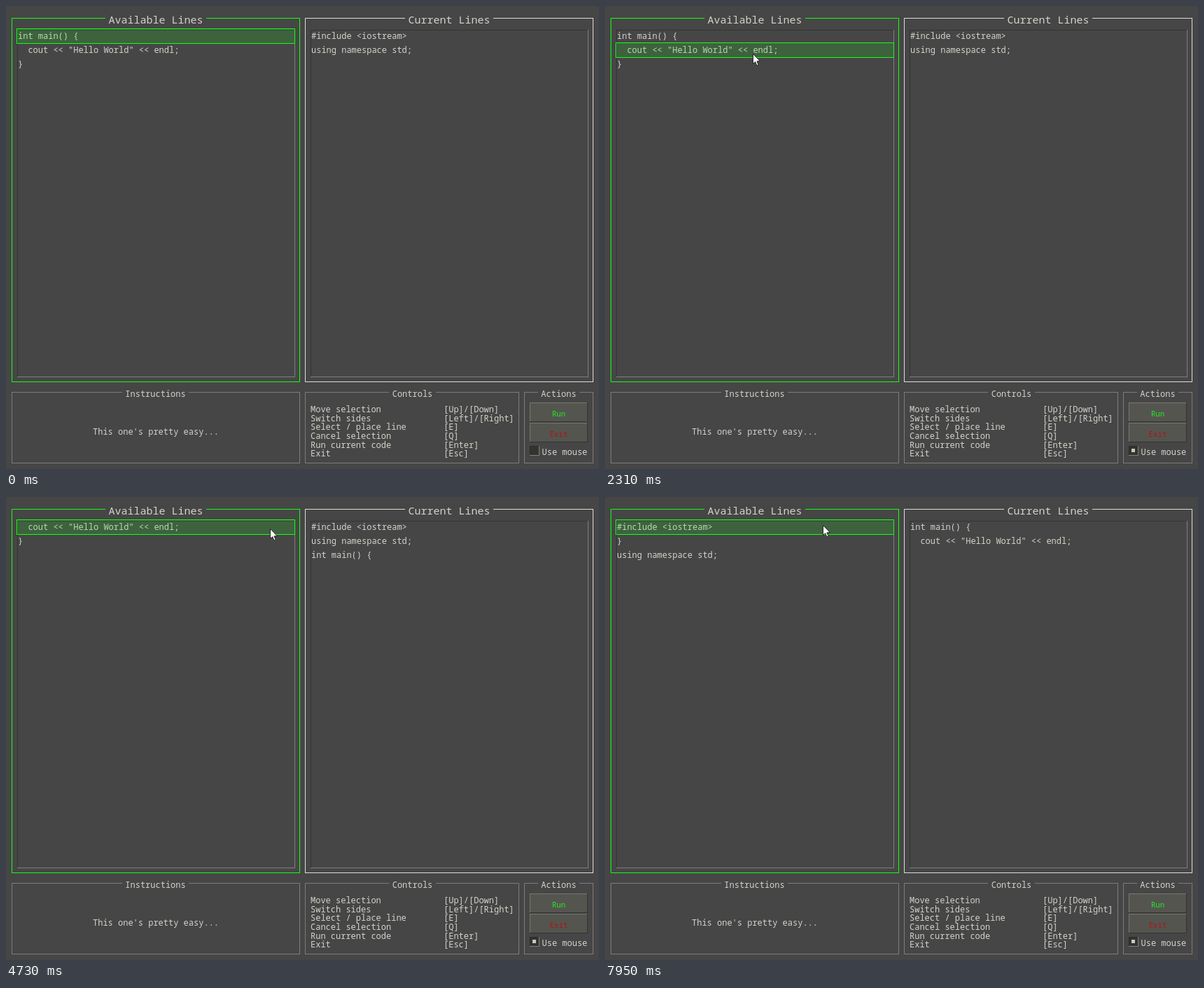
These frames come from a looping animation (847 by 661 pixels, 8000 ms). An HTML page with a canvas:

```html
<!DOCTYPE html>
<html lang="en">
<head>
<meta charset="utf-8">
<title>Line puzzle</title>
<style>
  html, body { margin: 0; height: 100%; overflow: hidden; background: #464646; }
  canvas { display: block; }
</style>
</head>
<body>
<canvas id="stage" width="847" height="661"></canvas>
<script>
const ctx = document.getElementById('stage').getContext('2d');
const LOOP = 8000, ROW = 20, LIST_TOP = 33;
const TEXT = '#d3d3cb', GREEN = '#11ff11', CYAN = '#22f4f4';

const LINES = {
  m: 'int main() {',
  c: '  cout << "Hello World" << endl;',
  b: '}',
  i: '#include <iostream>',
  u: 'using namespace std;'
};

const PANES = [
  { x: 8, list: 16, title: 'Available Lines', center: 214 },
  { x: 427, list: 435, title: 'Current Lines', center: 633 }
];

const CONTROLS = [
  ['Move selection', '[Up]/[Down]'],
  ['Switch sides', '[Left]/[Right]'],
  ['Select / place line', '[E]'],
  ['Cancel selection', '[Q]'],
  ['Run current code', '[Enter]'],
  ['Exit', '[Esc]']
];

// start, available lines, current lines, mode, side, row
const PHASES = [
  [0, 'mcb', 'iu', 'fixed', 0, 0],
  [1210, 'mcb', 'iu', 'hover'],
  [3900, 'mcb', 'iu', 'held', 0, 0],
  [4450, 'cb', 'ium', 'fixed', 0, 0],
  [5000, 'cb', 'ium', 'held', 0, 0],
  [5550, 'b', 'iumc', 'fixed', 0, 0],
  [5620, 'b', 'iumc', 'hover'],
  [5950, 'b', 'iumc', 'held', 1, 1],
  [6560, 'bu', 'imc', 'fixed', 0, 1],
  [6840, 'bu', 'imc', 'hover'],
  [7050, 'bu', 'imc', 'held', 1, 0],
  [7600, 'ibu', 'mc', 'fixed', 0, 0]
];

// time, x, y of the pointer tip
const PATH = [
  [130, 767, 656], [400, 755, 640], [540, 746, 638], [670, 752, 638],
  [1000, 752, 638], [1630, 234, 51], [1755, 234, 51], [1900, 216, 60],
  [2170, 202, 80], [2380, 215, 62], [2590, 300, 46], [2870, 505, 40],
  [3000, 550, 60], [3210, 540, 64], [3420, 470, 42], [3700, 332, 43],
  [3900, 332, 43], [4250, 455, 80], [4400, 455, 80], [4730, 377, 45],
  [4800, 372, 45], [5000, 372, 45], [5350, 471, 100], [5500, 471, 100],
  [5690, 473, 65], [6020, 473, 65], [6230, 340, 58], [6500, 340, 58],
  [6770, 482, 53], [6980, 500, 42], [7050, 500, 42], [7330, 366, 39],
  [7400, 358, 38], [7550, 358, 38], [7950, 311, 40], [8000, 311, 40]
];

const clamp = (v, lo, hi) => Math.max(lo, Math.min(hi, v));

function pointerAt(t) {
  if (t < PATH[0][0]) return null;
  const next = PATH.findIndex(key => key[0] > t);
  const [t0, x0, y0] = PATH[next - 1], [t1, x1, y1] = PATH[next];
  const k = (t - t0) / (t1 - t0);
  return { x: Math.round(x0 + (x1 - x0) * k), y: Math.round(y0 + (y1 - y0) * k) };
}

function rect(x, y, w, h, color) {
  ctx.fillStyle = color;
  ctx.fillRect(x, y, w, h);
}

function frame(x, y, right, bottom, topLeft, bottomRight = topLeft) {
  rect(x, y, right - x + 1, 1, topLeft);
  rect(x, y, 1, bottom - y + 1, topLeft);
  rect(x, bottom, right - x + 1, 1, bottomRight);
  rect(right, y, 1, bottom - y + 1, bottomRight);
}

function text(str, x, y, { size = 12, color = TEXT, align = 'left' } = {}) {
  ctx.font = `${size}px "Noto Sans Mono", monospace`;
  ctx.textAlign = align;
  ctx.fillStyle = color;
  ctx.fillText(str, x, y);
}

function group(x, y, right, bottom, color, title, center, baseline, size = 12) {
  frame(x, y, right, bottom, color);
  const width = title.length * size * 0.6 + 9;
  rect(Math.round(center - width / 2), y, Math.round(width), 1, '#464646');
  text(title, center, baseline, { size, align: 'center' });
}

function button(label, y, color) {
  rect(748, y, 83, 28, '#555550');
  frame(748, y, 830, y + 27, '#777772', '#33332f');
  text(label, 789.5, y + 20, { size: 10.67, color, align: 'center' });
}

function drawBottom(checked) {
  const grey = '#7c7c7c';
  group(8, 551, 419, 652, grey, 'Instructions', 213.5, 558);
  text("This one's pretty easy...", 214, 612, { align: 'center' });

  group(427, 551, 732, 652, grey, 'Controls', 580.5, 558);
  CONTROLS.forEach(([action, key], i) => {
    const y = Math.round(580 + i * 12.65);
    text(action, 435, y);
    text(key, 625, y);
  });

  group(740, 551, 838, 652, grey, 'Actions', 789.5, 558);
  button('Run', 566, '#22ee22');
  button('Exit', 595, '#b01414');
  rect(749, 628, 13, 14, '#333330');
  frame(748, 628, 761, 641, '#2b2b2b', '#80807a');
  if (checked) rect(752, 632, 5, 5, '#c8c8c0');
  text('Use mouse', 765.5, 641);
}

function drawPane(pane, lines, border) {
  group(pane.x, 17, pane.x + 411, 536, border, pane.title, pane.center, 25, 15);
  frame(pane.list, 34, pane.list + 396, 529, '#353535', '#7f7f7f');
  [...lines].forEach((id, i) => text(LINES[id], pane.list + 1, 47 + i * ROW));
}

function drawHighlight(pane, row, color) {
  const x = pane.list - 1, y = LIST_TOP + row * ROW;
  ctx.globalAlpha = 0.15;
  rect(x, y, 398, 21, color);
  ctx.globalAlpha = 1;
  frame(x, y - (row ? 1 : 1) + 0, x + 397, y + 20, color);
}

function drawPointer({ x, y }) {
  ctx.save();
  ctx.translate(x, y);
  ctx.beginPath();
  [[0.5, 0.5], [0.5, 14.5], [3.6, 11.7], [6, 17], [8.2, 16], [5.9, 10.9], [10.3, 10.6]]
    .forEach(point => ctx.lineTo(...point));
  ctx.closePath();
  ctx.fillStyle = '#fff';
  ctx.strokeStyle = '#262626';
  ctx.lineWidth = 1;
  ctx.fill();
  ctx.stroke();
  ctx.restore();
}

function draw(t) {
  const phase = PHASES.findLast(p => p[0] <= t);
  const lists = [phase[1], phase[2]], mode = phase[3];
  let [, , , , side, row] = phase;
  const pointer = pointerAt(t);
  if (mode === 'hover') {
    side = pointer.x < 423 ? 0 : 1;
    row = clamp(Math.floor((pointer.y - LIST_TOP) / ROW), 0, lists[side].length - 1);
  }
  const color = mode === 'held' ? CYAN : GREEN;

  rect(0, 0, 847, 661, '#464646');
  PANES.forEach((pane, i) => drawPane(pane, lists[i], i === side ? color : '#dcdcdc'));
  drawHighlight(PANES[side], row, color);

  if (mode === 'held') {
    const other = 1 - side;
    const over = (pointer.x < 423 ? 0 : 1) === other;
    const slot = over
      ? clamp(Math.round((pointer.y - LIST_TOP) / ROW), 0, lists[other].length) : 0;
    rect(PANES[other].list, LIST_TOP + slot * ROW - 1, 396, 1, color);
  }

  drawBottom(t >= 600);
  if (pointer) drawPointer(pointer);
}

function tick() {
  draw(performance.now() % LOOP);
  requestAnimationFrame(tick);
}
tick();
</script>
</body>
</html>
```
